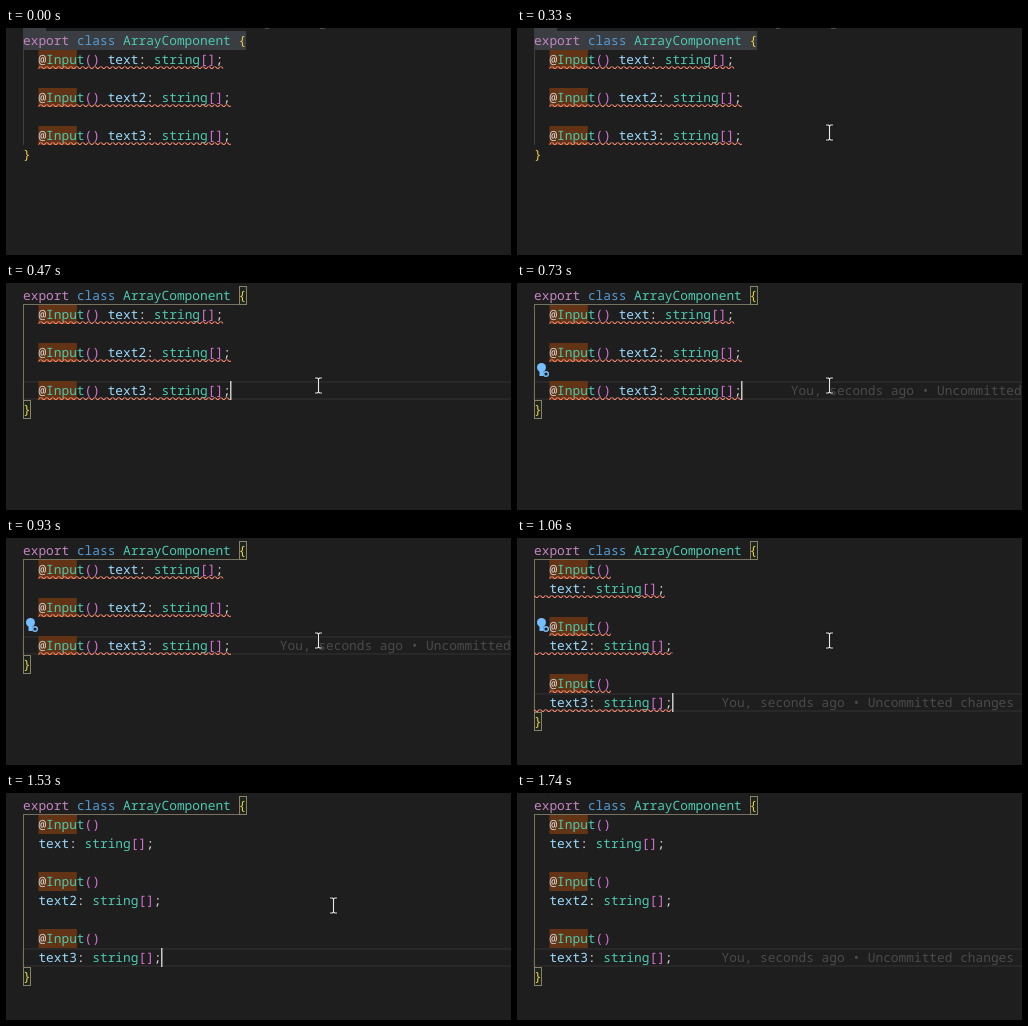
Write an HTML page that moves like this. It is 505x227 px and loops after 2.21 s.

```html
<!DOCTYPE html>
<html lang="en">
<head>
<meta charset="utf-8">
<title>Editor formatting</title>
<style>
html, body { margin: 0; width: 100%; height: 100%; overflow: hidden; background: #1e1e1e; }
svg { display: block; }
text {
  font: 12.83px "Noto Sans Mono", "DejaVu Sans Mono", monospace;
  white-space: pre;
  text-rendering: geometricPrecision;
}
</style>
</head>
<body>
<svg width="505" height="227" viewBox="0 0 505 227">
  <defs>
    <pattern id="wave" width="6" height="19" y="3" patternUnits="userSpaceOnUse">
      <path transform="translate(0 16)" fill="#f48771"
        d="M5.5 0L2.5 3H1.1L4.1 0ZM4 0L6 2V.6L5.4 0ZM0 2L1 3H2.4L0 .6Z"/>
    </pattern>
  </defs>
  <g id="view"></g>
</svg>
<script>
const LOOP = 2210, LEFT = 17, CHAR = 7.697, LINE = 19;
const layer = document.getElementById('view');

const before = ['export class ArrayComponent {', '  @Input() text: string[];', '',
  '  @Input() text2: string[];', '', '  @Input() text3: string[];', '}'];
const after = before.flatMap(s => s.startsWith('  @') ? ['  @Input()', '  ' + s.slice(11)] : [s]);

const colors = [
  [/export/, '#c586c0'], [/class/, '#569cd6'], [/Array|Input|string/, '#4ec9b0'],
  [/text/, '#9cdcfe'], [/[{}]/, '#e8c94a'], [/[()[\]]/, '#da70d6'], [/./, '#d4d4d4']
];

// Pointer stops: time, x, y
const enter = [[120, 437, 210], [190, 390, 170], [260, 335, 125], [330, 312, 104], [400, 312, 102]];
const leave = [[1460, 314, 103], [1530, 327, 112], [1600, 365, 150], [1670, 410, 212]];
const stops = [...enter, ...leave];

const colX = col => LEFT + col * CHAR;
const rowY = row => 3 + row * LINE;
const rect = (x, y, w, h, fill) => `<rect x="${x}" y="${y}" width="${w}" height="${h}" fill="${fill}"/>`;
const label = (x, row, s, fill) => `<text x="${x}" y="${rowY(row) + 14}" fill="${fill}">${s}</text>`;

function code(s, row) {
  return [...s.matchAll(/\w+|[^\w\s]/g)].map(m =>
    label(colX(m.index), row, m[0], colors.find(([re]) => re.test(m[0]))[1])).join('');
}

function squiggle(s, row, from) {
  return rect(colX(from), rowY(row) + 16, (s.length - from) * CHAR, 3, 'url(#wave)');
}

const bracketBox = (col, row) =>
  `<rect x="${Math.round(colX(col)) + .5}" y="${rowY(row) + .5}" width="7" height="18" fill="#1c251c" stroke="#8a8168"/>`;

const bulb = `<g fill="#75beff"><circle cx="24.5" cy="84.5" r="4.5"/>
  <path d="M22.5 88h4v5h-4z"/>
  <circle cx="29" cy="91" r="2.3" fill="#1e1e1e" stroke="#75beff" stroke-width="1.4"/></g>`;

function pointer(t) {
  const spot = stops.filter(p => p[0] <= t).pop();
  if (!spot || t >= 1740) return '';
  const d = 'M-3.5-7.5H-1L0-6.5L1-7.5H3.5M0-6.5V6.5M-3.5 7.5H-1L0 6.5L1 7.5H3.5';
  return `<g transform="translate(${spot[1] + .5} ${spot[2] + .5})" fill="none">
    <path d="${d}" stroke="#111" stroke-width="2.6"/><path d="${d}" stroke="#e8e8e8" stroke-width="1.2"/></g>`;
}

function scene(t) {
  const focused = t >= 470, formatted = t >= 1060;
  const lines = formatted ? after : before;
  const last = lines.length - 1, row = last - 1, end = colX(lines[row].length);
  const caret = focused && t < 930 || formatted && t < 1600;
  const blame = t >= 730 && t < 1130 || t >= 1740;
  let out = '';

  if (focused) {
    out += `<rect x="17" y="${rowY(row) + 1}" width="500" height="17" fill="none" stroke="#282828" stroke-width="2"/>`;
    out += rect(17, 22, 1, rowY(last) - 22, '#77725f') + rect(17, 21, 216, 1, '#77725f');
    out += bracketBox(28, 0) + bracketBox(0, last);
  } else {
    out += rect(17, 0, 23, 3, '#3a3d41') + rect(17, 3, 29 * CHAR, LINE, '#3a3d41');
    out += rect(259, 0, 4, 1, '#4b4b4b') + rect(314, 0, 5, 1, '#4b4b4b');
    out += rect(17, 22, 1, rowY(last) - 22, '#404040');
  }
  out += label(LEFT, -1, '}', '#da70d6') + label(colX(1), -1, ')', '#e8c94a');

  lines.forEach((s, i) => {
    const input = s.includes('@');
    if (input) out += rect(colX(2), rowY(i), 5 * CHAR, LINE, '#623314');
    out += code(s, i);
    if (input && t < 1130) out += squiggle(s, i, 2);
    if (!input && s.includes('text') && t < 1330) out += squiggle(s, i, 0);
  });

  if (blame) out += label(end + 49, row, 'You, seconds ago • Uncommitted changes', '#4b4b4b');
  if (t >= 730 && t < 1130) out += bulb;
  if (caret) out += rect(Math.round(end) - 1, rowY(row), 1.5, LINE, '#c8c8c6');
  return out + pointer(t);
}

let shown;
function tick(now) {
  const next = scene(now % LOOP);
  if (next !== shown) layer.innerHTML = shown = next;
  requestAnimationFrame(tick);
}
tick(0);
</script>
</body>
</html>
```
